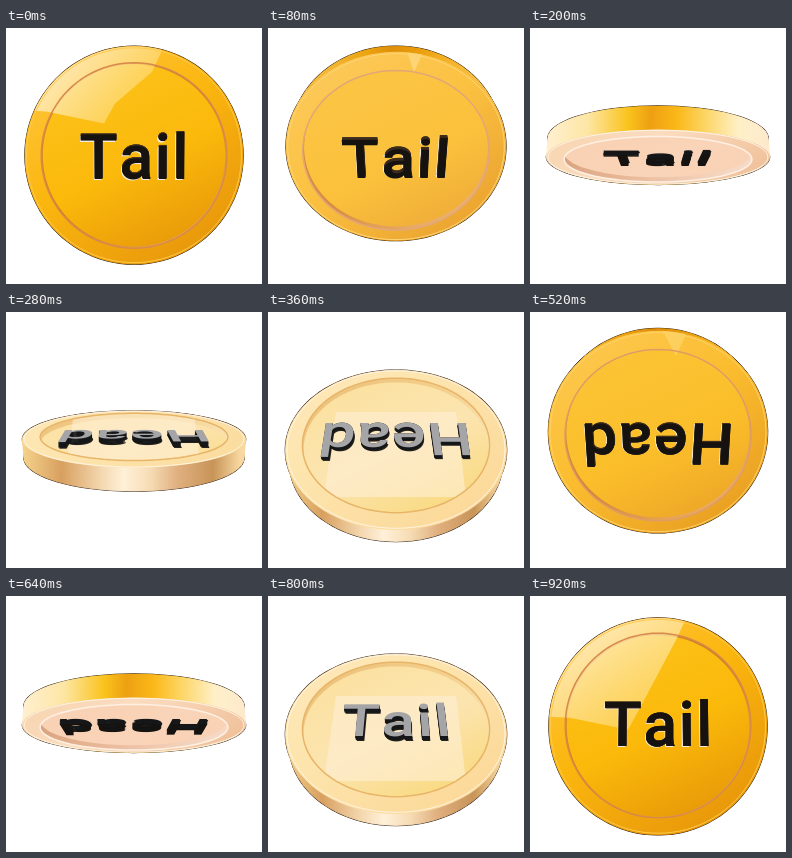
An HTML page with a canvas for the animation above (960 ms loop, 256x256 px).

```html
<!DOCTYPE html>
<html lang="en">
<head>
<meta charset="utf-8">
<title>Coin flip</title>
<style>
  html, body { margin: 0; width: 100%; height: 100%; overflow: hidden; background: #fff; }
  canvas { display: block; width: 256px; height: 256px; }
</style>
</head>
<body>
<canvas id="stage" width="256" height="256"></canvas>
<script>
const ctx = document.getElementById('stage').getContext('2d');
const LOOP = 960, STEP = 40, CENTER = 128, CAMERA = 365;
const RADIUS = 106.3, LIP = 90.5, HALF = 9, FLOOR = 3, TEXT_TOP = 5;
const FONT_SIZE = 62, CAP = FONT_SIZE * 0.711, TRACK = 1.6;
// [step, angle in degrees]
const PACE = [[0, 2], [5, 75], [9, 136], [11, 168.5], [16, 255], [20, 316], [23, 354], [24, 362]];

const clamp = v => Math.max(0, Math.min(1, v));
const rgb = hex => [1, 3, 5].map(i => parseInt(hex.slice(i, i + 2), 16));
function mix(a, b, t) {
  const from = rgb(a), to = rgb(b);
  return '#' + from.map((v, i) => Math.round(v + (to[i] - v) * t).toString(16).padStart(2, '0')).join('');
}

function angleAt(step) {
  const i = PACE.findIndex(p => p[0] > step);
  const [s0, a0] = PACE[i - 1], [s1, a1] = PACE[i];
  return (a0 + (a1 - a0) * (step - s0) / (s1 - s0)) * Math.PI / 180;
}

function projector(angle, side) {
  const c = Math.cos(angle), s = Math.sin(angle);
  return (u, v, w) => {
    const x = u * side, z = w * side;
    const scale = CAMERA / (CAMERA - v * s - z * c);
    return [CENTER + x * scale, CENTER - (v * c - z * s) * scale];
  };
}

function polygon(points) {
  ctx.beginPath();
  points.forEach(p => ctx.lineTo(...p));
  ctx.closePath();
}

function circle(project, radius, depth) {
  polygon(Array.from({ length: 96 }, (_, i) => {
    const a = i * Math.PI / 48;
    return project(radius * Math.cos(a), radius * Math.sin(a), depth);
  }));
}

function gradient(x0, y0, x1, y1, stops) {
  const g = ctx.createLinearGradient(x0, y0, x1, y1);
  stops.forEach(([at, color]) => g.addColorStop(at, color));
  return g;
}

// Blends stops of the face-on look towards the tilted look
function blend(flat, down, up, look) {
  return flat.map(([at, color], i) =>
    [at, mix(color, look.down ? down[i] : up[i], look.down || look.up)]);
}

function drawEdge(project, look) {
  ctx.strokeStyle = '#24160c';
  ctx.lineWidth = 1.5;
  for (const depth of [-HALF, HALF]) {
    circle(project, RADIUS, depth);
    ctx.stroke();
  }
  const stops = blend(
    [[0, '#f2a812'], [0.2, '#efa20c'], [0.38, '#e59608'], [0.48, '#d98808'], [0.6, '#e39206'], [0.72, '#efa20c'], [0.88, '#f4ad14'], [1, '#eda010']],
    ['#fff0d4', '#fde6a4', '#fac31c', '#eda012', '#fbb818', '#fcd460', '#fff0c8', '#fdeacc'],
    ['#f8d890', '#d8a060', '#f4d8b0', '#fff0d8', '#f6dcb4', '#e0b080', '#c89458', '#f8d8a0'], look);
  ctx.fillStyle = ctx.strokeStyle = gradient(17, 0, 239, 8, stops);
  ctx.lineWidth = 0.6;
  circle(project, RADIUS, -HALF);
  ctx.fill();
  const n = 64;
  for (let i = 0; i < n; i++) {
    const at = (k, depth) => project(
      RADIUS * Math.cos(k * 2 * Math.PI / n), RADIUS * Math.sin(k * 2 * Math.PI / n), depth);
    polygon([at(i, -HALF), at(i + 1, -HALF), at(i + 1, HALF), at(i, HALF)]);
    ctx.fill();
    ctx.stroke();
  }
}

// Window reflection that slides down the face as the coin leans back
function drawShine(look) {
  const fade = 1 - (look.down || look.up);
  if (fade > 0.2) {
    const bottom = Math.min(186, 105 - 275 * look.tilt);
    ctx.fillStyle = gradient(50, 40, 115, bottom, [
      [0, `rgba(255,243,214,${0.78 * fade})`], [1, `rgba(255,226,140,${0.5 * fade})`]]);
    polygon([[0, bottom - 14], [40, bottom - 12], [98, bottom], [109, Math.min(125, bottom - 20)], [146, 44], [160, 14], [0, 0]]);
    ctx.fill();
  }
  if (look.up > 0.5) {
    ctx.fillStyle = `rgba(255,240,214,${0.6 * look.up})`;
    polygon([[68, 100], [188, 100], [198, 185], [56, 185]]);
    ctx.fill();
  }
}

function drawFace(project, look) {
  const tilted = look.down || look.up;
  ctx.save();
  circle(project, RADIUS, HALF);
  ctx.fillStyle = gradient(50, 30, 190, 225, blend(
    [[0, '#ffc63c'], [0.45, '#fbb60e'], [1, '#e8980a']],
    ['#f4cfa4', '#fbdcc0', '#eab488'], ['#ffe9bc', '#fde4ac', '#fbd898'], look));
  ctx.fill();
  ctx.clip();
  if (tilted < 0.5) drawShine(look);
  ctx.restore();

  ctx.strokeStyle = mix('#ffc94a', '#fff4e2', tilted);
  ctx.lineWidth = 1;
  circle(project, RADIUS - 1.5, HALF);
  ctx.stroke();

  ctx.save();
  circle(project, LIP, HALF);
  ctx.fillStyle = gradient(40, 40, 200, 215, blend(
    [[0, '#d98a32'], [0.5, '#d07c20'], [1, '#f0a850']],
    ['#c88a60', '#e8b898', '#fff0e4'], ['#e8bc74', '#f4cf8c', '#fff0cc'], look));
  ctx.fill();
  ctx.clip();
  circle(project, LIP, FLOOR);
  ctx.fillStyle = gradient(80, 40, 165, 220, blend(
    [[0, '#fcc21a'], [0.55, '#fbb90a'], [1, '#e89a08']],
    ['#f8ceb0', '#fad4b8', '#f8ceb0'], ['#fbe09a', '#fce4b0', '#f8d878'], look));
  ctx.fill();
  drawShine(look);
  ctx.restore();

  circle(project, LIP, HALF);
  ctx.strokeStyle = look.down ? mix('#d88a48', '#fff0e4', look.down) : mix('#d88a48', '#e8b468', look.up);
  ctx.lineWidth = 1.5;
  ctx.stroke();
}

function drawWord(project, word, height, look) {
  ctx.font = `500 ${FONT_SIZE}px Roboto, "Open Sans", sans-serif`;
  ctx.textAlign = 'center';
  const widths = [...word].map(ch => ctx.measureText(ch).width + TRACK);
  const tilted = look.down || look.up;
  let pen = -widths.reduce((a, b) => a + b) / 2;
  [...word].forEach((ch, i) => {
    const u = pen + widths[i] / 2;
    pen += widths[i];
    const stamp = (depth, color, dx = 0, dy = 0) => {
      const p = project(u, height, depth), pu = project(u + 1, height, depth), pv = project(u, height + 1, depth);
      ctx.setTransform(pu[0] - p[0], pu[1] - p[1], p[0] - pv[0], p[1] - pv[1], p[0] + dx, p[1] + dy);
      ctx.fillStyle = color;
      ctx.fillText(ch, 0, CAP / 2);
    };
    if (tilted < 0.5) stamp(1, '#f4ece2', -1.2, 1.4);
    else stamp(0, '#25221f', 1, 1);
    for (let depth = 0; depth < TEXT_TOP; depth++) stamp(depth, mix('#4a3520', '#161719', tilted));
    const gray = Math.max(look.up, word === 'Head' && i > 1 && look.tilt < 0 ? 0.8 : 0);
    stamp(TEXT_TOP, mix('#15120f', '#a5a4a6', gray));
  });
  ctx.setTransform(1, 0, 0, 1, 0, 0);
}

function draw(step) {
  const angle = angleAt(step);
  const tails = Math.cos(angle) > 0;
  const tilt = Math.atan(Math.tan(angle));
  const look = {
    tilt,
    down: clamp(tilt / 1.25) ** 1.5,
    up: clamp((-tilt - 0.15) / 0.6)
  };
  const project = projector(angle, tails ? 1 : -1);
  ctx.fillStyle = '#fff';
  ctx.fillRect(0, 0, 256, 256);
  drawEdge(project, look);
  drawFace(project, look);
  drawWord(project, tails ? 'Tail' : 'Head', tails ? 0 : 3, look);
}

const start = performance.now();
function tick() {
  draw(Math.floor(((performance.now() - start) % LOOP) / STEP));
  requestAnimationFrame(tick);
}
tick();
</script>
</body>
</html>
```
